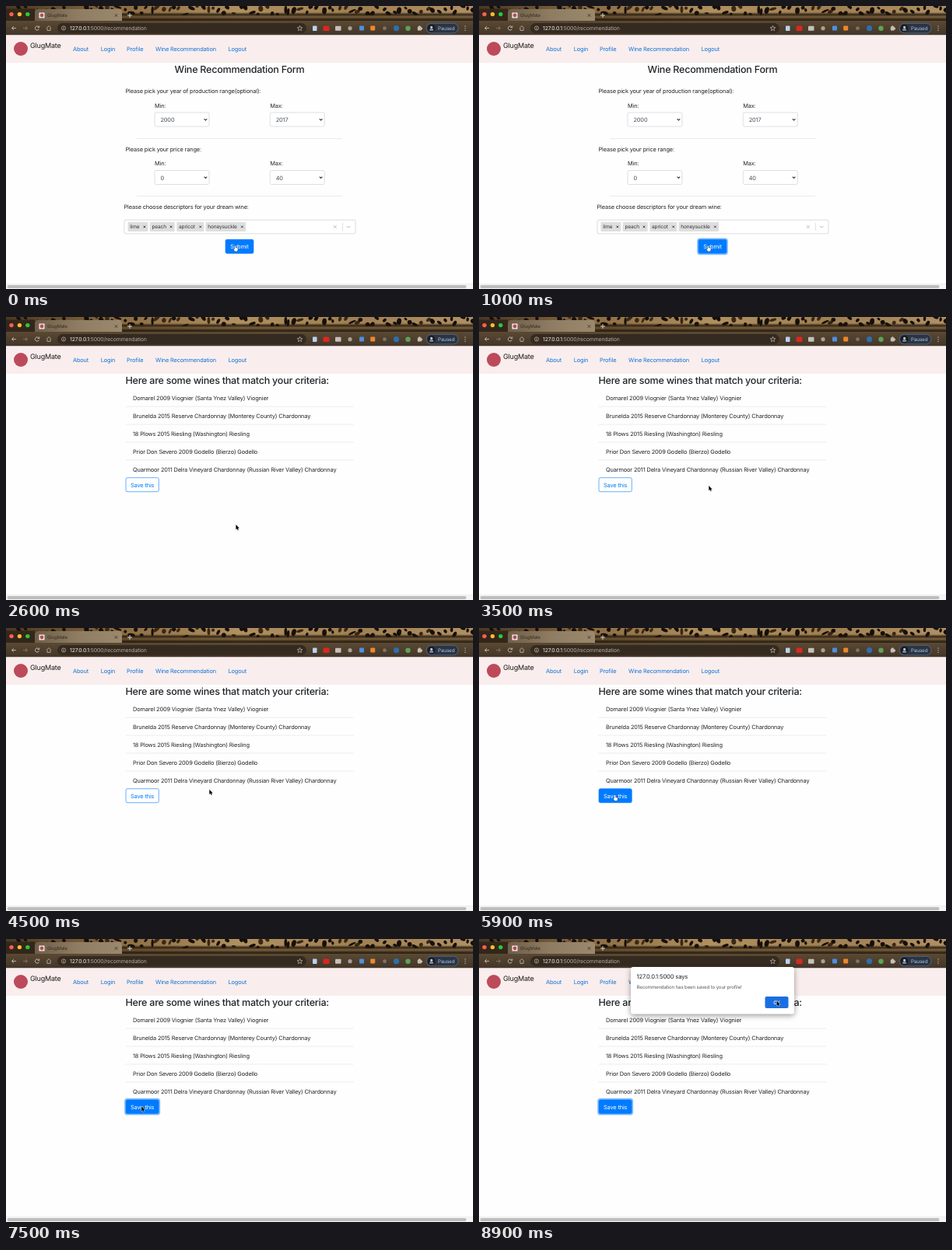
Write an HTML page with a canvas that moves like this. It is 600 px wide and 364 px high and loops after 9000 ms.

```html
<!DOCTYPE html>
<html lang="en">
<head>
<meta charset="utf-8">
<title>GlugMate</title>
<style>
  html, body { margin: 0; width: 100%; height: 100%; overflow: hidden; background: #fefefe; }
  canvas { display: block; width: 600px; height: 364px; }
</style>
</head>
<body>
<canvas id="stage"></canvas>
<script>
const W = 600, H = 364, LOOP = 9000, STEP = 100;
const BLUE = '#007bff', INK = '#212529', LINE = '#dedfe1', GREY = '#c9c0b5';
const cv = document.getElementById('stage');
const c = cv.getContext('2d');
const dpr = window.devicePixelRatio || 1;
cv.width = W * dpr;
cv.height = H * dpr;

// Moments at which the picture switches
const FOCUS_SUBMIT = 600, RESULTS = 1300, LEAVE = 2300, HOVER = 5600,
      CLICK = 6500, BLUR = 7300, ALERT = 7600;

// Pointer path: time, x, y
const path = [
  [0, 293.8, 308.2], [LEAVE, 293.8, 308.2], [2900, 297, 226], [3200, 295.3, 217],
  [3600, 295.3, 217], [4100, 284, 223], [4500, 261.3, 207.7], [5000, 238, 215],
  [5700, 174, 215], [8000, 174, 215], [8500, 350, 100], [8800, 382.5, 79.5], [LOOP, 382.5, 79.5]
];

function pointer(t) {
  let i = 0;
  while (i < path.length - 2 && t >= path[i + 1][0]) i++;
  const [t0, x0, y0] = path[i], [t1, x1, y1] = path[i + 1];
  const p = (t - t0) / (t1 - t0), e = p * p * (3 - 2 * p);
  return [x0 + (x1 - x0) * e, y0 + (y1 - y0) * e];
}

function random(seed) {
  return () => (seed = (seed * 16807) % 2147483647) / 2147483647;
}

function text(s, x, y, size = 7.4, color = INK, align = 'left', weight = 400) {
  c.font = `${weight} ${size}px Inter, "Liberation Sans", sans-serif`;
  c.letterSpacing = `${-0.02 * size}px`;
  c.textRendering = 'geometricPrecision';
  c.textAlign = align;
  c.fillStyle = color;
  c.fillText(s, x, y + size * 0.364);
  return c.measureText(s).width;
}

function rect(x, y, w, h, color) {
  c.fillStyle = color;
  c.fillRect(x, y, w, h);
}

function box(x, y, w, h, r, fill, stroke, lw = 0.6) {
  c.beginPath();
  c.roundRect(x, y, w, h, r);
  if (fill) { c.fillStyle = fill; c.fill(); }
  if (stroke) { c.strokeStyle = stroke; c.lineWidth = lw; c.stroke(); }
}

function disc(x, y, r, color) {
  c.fillStyle = color;
  c.beginPath();
  c.arc(x, y, r, 0, 7);
  c.fill();
}

function poly(color, lw, ...pts) {
  c.strokeStyle = color;
  c.lineWidth = lw;
  c.beginPath();
  for (let i = 0; i < pts.length; i += 2) c.lineTo(pts[i], pts[i + 1]);
  c.stroke();
}

function cross(x, y, r, color, lw) {
  poly(color, lw, x - r, y - r, x + r, y + r);
  poly(color, lw, x - r, y + r, x + r, y - r);
}

function fade(x0, y0, x1, y1, ...stops) {
  const g = c.createLinearGradient(x0, y0, x1, y1);
  stops.forEach((s, i) => g.addColorStop(i / (stops.length - 1), s));
  return g;
}

function leopard() {
  const rnd = random(41);
  rect(0, 0, W, 20, fade(0, 0, W, 0, '#4a3823', '#8d6d44', '#b0905f', '#a08052', '#b09064'));
  c.save();
  c.beginPath();
  c.rect(0, 0, W, 12);
  c.clip();
  for (let i = 0; i < 85; i++) {
    c.fillStyle = rnd() < 0.8 ? '#160f09' : '#3a2814';
    c.beginPath();
    c.ellipse(i * 7.1 + rnd() * 5, rnd() * 11, 2 + rnd() * 3.2, 1.3 + rnd() * 1.8, rnd() * 3, 0, 7);
    c.fill();
  }
  c.restore();
  // soft dark folds of the cloth under the spots
  rect(0, 8, W, 12, fade(0, 8, 0, 20, 'rgba(30,21,12,0)', 'rgba(26,18,10,.85)',
    'rgba(80,60,34,.55)', 'rgba(32,23,13,.85)', 'rgba(46,34,21,1)'));
  rect(0, 3.5, 37, 16, '#33261a');
}

function toolbar() {
  rect(0, 19, W, 18.5, fade(0, 19, 0, 37.5, '#5a4933', '#4e3f2d', '#43362a'));
  poly(GREY, 0.9, 13, 28.5, 7.5, 28.5);
  poly(GREY, 0.9, 10, 26, 7.5, 28.5, 10, 31);
  poly('#85786a', 0.9, 22, 28.5, 27.5, 28.5);
  poly('#85786a', 0.9, 25, 26, 27.5, 28.5, 25, 31);
  c.strokeStyle = GREY;
  c.beginPath();
  c.arc(40, 28.5, 2.6, 0.4, 5.6);
  c.stroke();
  poly(GREY, 0.9, 42.8, 25.5, 42.8, 27.6, 40.6, 27.6);
  poly(GREY, 0.8, 51.8, 28.7, 55, 25.6, 58.2, 28.7);
  poly(GREY, 0.8, 53, 28.5, 53, 31.4, 57, 31.4, 57, 28.5);

  box(66, 22, 320, 13, 6.5, '#352a1f');
  c.strokeStyle = GREY;
  c.lineWidth = 0.7;
  c.beginPath();
  c.arc(74, 28.5, 2.6, 0, 7);
  c.stroke();
  rect(73.6, 28, 0.8, 2, GREY);
  rect(73.6, 26.8, 0.8, 0.7, GREY);
  const w = text('127.0.0.1', 82, 28.7, 6.9, '#f4f1ed');
  text(':5000/recommendation', 82 + w, 28.7, 6.9, '#b5aca1');

  c.strokeStyle = GREY;
  c.beginPath();
  for (let i = 0; i < 10; i++) {
    const a = i * Math.PI / 5 - Math.PI / 2, r = i % 2 ? 1.5 : 3.5;
    c.lineTo(377.5 + r * Math.cos(a), 28.8 + r * Math.sin(a));
  }
  c.closePath();
  c.stroke();

  box(394, 25.5, 5.5, 6.5, 0.8, '#b9d1f4');
  box(407.5, 25.5, 8, 6.4, 1.5, '#d9281f');
  box(423, 25.8, 7.5, 6, 0.8, '#c5c0ba');
  disc(442, 28.7, 2.6, '#a89f95');
  box(454, 25.6, 6, 6, 1, '#4e8fe0');
  box(468.2, 25.6, 6, 6, 1, '#f0872b');
  disc(486.5, 28.7, 2.4, '#7d7368');
  disc(501.5, 28.7, 3.6, '#2d6fae');
  disc(516.5, 28.7, 3.2, '#5fa356');
  box(528.8, 26.6, 5, 5, 0.8, '#c5beb5');
  disc(531.3, 26.4, 1.2, '#c5beb5');
  disc(534, 29, 1.2, '#c5beb5');

  box(540, 22.3, 41, 12.6, 6.3, '#2c3440', '#5878a4', 0.7);
  disc(546.6, 28.6, 4.8, '#171b25');
  disc(546.6, 27.3, 1.6, '#d4c8ba');
  box(544, 29, 5.2, 3, 1.5, '#7e8794');
  text('Paused', 555, 28.7, 6.3, '#a9c8f5');
  for (const y of [26, 28.6, 31.2]) disc(590, y, 0.7, GREY);
}

function browser() {
  leopard();
  box(37, 4, 112, 18, [4, 4, 0, 0], fade(37, 0, 149, 0, '#6e5e49', '#8f7d63', '#9b896e'));
  ['#f95f57', '#fbbd2e', '#29c83f'].forEach((color, i) => disc(7 + i * 10.4, 10.6, 2.7, color));
  rect(42.5, 8.5, 7, 7, '#f0ebe8');
  disc(46, 12, 2.4, '#b94c5b');
  text('GlugMate', 53, 12, 5.9, '#392d20');
  cross(141.5, 12, 1.8, '#392d20', 0.8);
  poly('#eee5da', 0.9, 156, 12, 162, 12);
  poly('#eee5da', 0.9, 159, 9, 159, 15);
  toolbar();

  rect(0, 37.5, W, 35.5, '#f9eeed');
  disc(19, 55, 9, '#bd4a5a');
  text('GlugMate', 31, 51, 9, '#1c1c1c');
  [['About', 86], ['Login', 121.7], ['Profile', 155], ['Wine Recommendation', 192], ['Logout', 285.5]]
    .forEach(([s, x]) => text(s, x, 55.8, 7.4, '#1473d8'));

  rect(0, 357.5, W, 6.5, '#f5f5f5');
  rect(0, 357.5, W, 0.6, '#e4e4e4');
  box(1.5, 359, 590, 4, 2, '#bdbdbd');
}

function dropdown(label, value, x, y) {
  text(label, x, y - 17.7);
  box(x, y - 9, 70, 18, 2, '#fff', '#c6ccd2');
  text(value, x + 7.5, y + 0.4, 7.4, '#495057');
  poly('#343a40', 1.1, x + 63.6, y - 0.9, x + 65.4, y + 1, x + 67.2, y - 0.9);
}

function button(label, x, y, w, solid, focus) {
  if (focus) box(x - 1, y - 1, w + 2, 20, 2.8, null, '#8bc1fb', 1.8);
  box(x, y, w, 18, 2, solid ? BLUE : '#fefefe', BLUE, 0.6);
  text(label, x + w / 2, y + 9.3, 7.4, solid ? '#fff' : BLUE, 'center');
}

function form(t) {
  text('Wine Recommendation Form', 300, 81.3, 12.55, INK, 'center', 500);
  text('Please pick your year of production range(optional):', 153.5, 109.8);
  dropdown('Min:', '2000', 191, 146);
  dropdown('Max:', '2017', 339.2, 146);
  rect(168, 170, 264, 0.6, LINE);
  text('Please pick your price range:', 153.5, 184.3);
  dropdown('Min:', '0', 191, 220.5);
  dropdown('Max:', '40', 339.2, 220.5);
  rect(168, 244.3, 264, 0.6, LINE);
  text('Please choose descriptors for your dream wine:', 151.5, 258.5);

  box(152, 275.2, 297, 17.6, 2, '#fff', '#c4c4c4');
  [['lime', 156.5, 26], ['peach', 184.7, 32], ['apricot', 219.3, 35], ['honeysuckle', 256.5, 51.5]]
    .forEach(([s, x, w]) => {
      box(x, 278, w, 12, 1, '#dedede');
      text(s, x + 2.8, 284, 6.5, '#333');
      cross(x + w - 4.6, 284, 1.3, '#333', 0.9);
    });
  cross(422.8, 284, 2, '#bbb', 0.9);
  rect(432, 279, 0.6, 10, '#ccc');
  poly('#bbb', 1, 437.8, 282.9, 440.2, 285.3, 442.6, 282.9);
  button('Submit', 282, 300.3, 36, true, t >= FOCUS_SUBMIT);
}

const wines = [
  'Domarel 2009 Viognier (Santa Ynez Valley) Viognier',
  'Brunelda 2015 Reserve Chardonnay (Monterey County) Chardonnay',
  '18 Plows 2015 Riesling (Washington) Riesling',
  'Prior Don Severo 2009 Godello (Bierzo) Godello',
  'Quarmoor 2011 Delra Vineyard Chardonnay (Russian River Valley) Chardonnay'
];

function results(t) {
  text('Here are some wines that match your criteria:', 153.5, 81.3, 12.55, INK, 'left', 500);
  wines.forEach((s, i) => {
    const y = 104 + i * 22.95;
    text(s, 163, y + 0.3);
    if (i < 4) rect(153.5, y + 10.8, 293, 0.6, LINE);
  });
  button('Save this', 154, 206.7, 42.3, t >= HOVER, t >= CLICK);
}

function dialog() {
  c.save();
  c.shadowColor = 'rgba(0,0,0,.4)';
  c.shadowBlur = 7 * dpr;
  c.shadowOffsetY = 2 * dpr;
  box(195, 36, 210, 60.5, 3, '#fff');
  c.restore();
  text('127.0.0.1:5000 says', 202.5, 48, 7.6, '#202124');
  text('Recommendation has been saved to your profile!', 202.5, 62, 6.1, '#55585c');
  box(367.5, 74, 30, 15, 2, '#1a6fe0');
  text('OK', 382.5, 81.7, 6.2, '#fff', 'center', 500);
}

function shape(x, y, d, fill, edge) {
  const p = new Path2D(d);
  c.save();
  c.translate(x, y);
  c.scale(0.9, 0.9);
  c.lineJoin = 'round';
  c.lineWidth = 0.8;
  c.strokeStyle = edge;
  c.stroke(p);
  c.fillStyle = fill;
  c.fill(p);
  c.restore();
}

const ARROW = 'M0 0V7L1.6 5.6L2.7 8.1L3.8 7.6L2.7 5.2H4.9Z';
const HAND = 'M-.7 .6Q0-.5 .7 .6V3L3.2 3.6Q4 3.8 3.9 4.7L3.2 8H-.4L-2.4 5Q-2.2 3.9-.7 5Z';

function draw(t) {
  c.setTransform(dpr, 0, 0, dpr, 0, 0);
  rect(0, 0, W, H, '#fefefe');
  browser();
  if (t < RESULTS) form(t); else results(t);
  if (t >= ALERT) dialog();
  const [x, y] = pointer(t);
  const hand = t < RESULTS || (t >= HOVER && t < BLUR);
  if (hand) shape(x + 0.6, y, HAND, '#fff', '#111');
  else shape(x, y, ARROW, '#000', '#fff');
}

const start = performance.now();
function frame() {
  const t = (performance.now() - start) % LOOP;
  draw(Math.floor(t / STEP) * STEP);
  requestAnimationFrame(frame);
}
frame();
</script>
</body>
</html>
```
